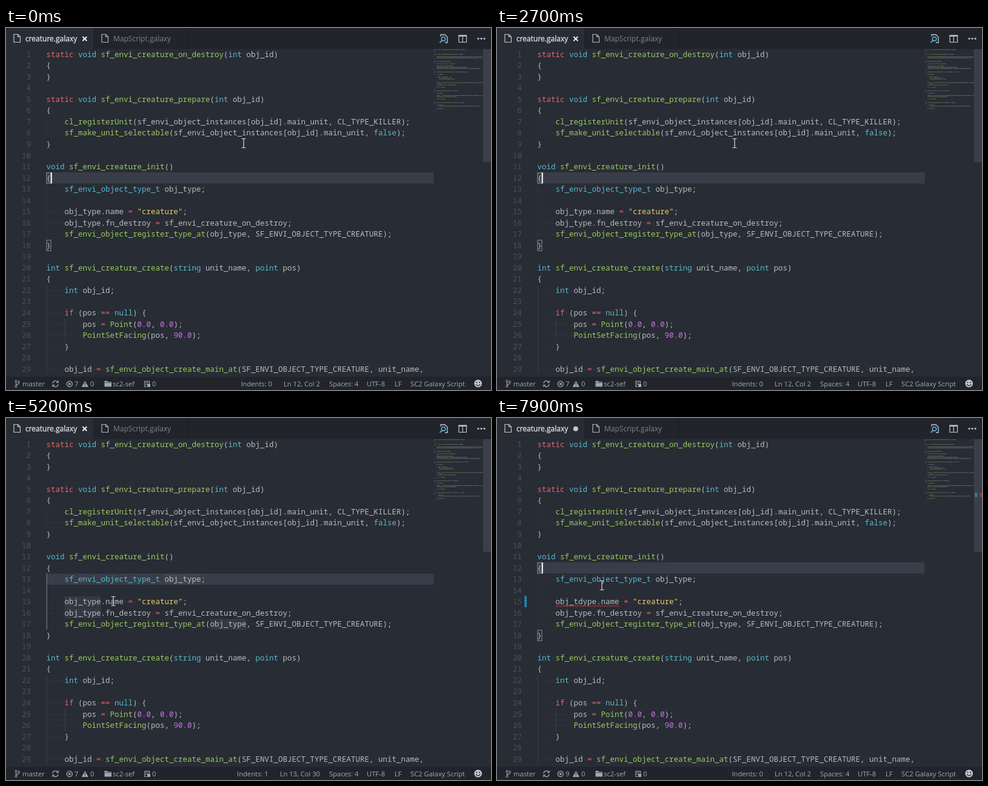
Write an HTML page that moves like this. It is 800 px wide and 597 px high and loops after 8000 ms.

```html
<!DOCTYPE html>
<html lang="en">
<head>
<meta charset="utf-8">
<title>Code editor</title>
<style>
html, body { margin: 0; width: 100%; height: 100%; overflow: hidden; background: #282c34; }
svg { display: block; width: 800px; height: 597px; }
.code { font: 12.5px "Noto Sans Mono", monospace; white-space: pre; }
.tab { font: 12px "Open Sans", sans-serif; }
.bar { font: 11.2px "Open Sans", sans-serif; fill: #a3a9b4; }
.end { text-anchor: end; }
</style>
</head>
<body>
<svg id="stage" viewBox="0 0 800 597" xmlns="http://www.w3.org/2000/svg"></svg>
<script>
(() => {
const LOOP = 8000, LEFT = 66.5, CHAR = 7.5, ROW = 18.536, SHOWN = 29;
const COLORS = { key: '#ee626b', type: '#57b9d0', fn: '#98cb62', num: '#c872e4',
  str: '#e8cd6c', text: '#babcc0', space: '#414650' };
const CODE = `static void sf_envi_creature_on_destroy(int obj_id)
{
}

static void sf_envi_creature_prepare(int obj_id)
{
    cl_registerUnit(sf_envi_object_instances[obj_id].main_unit, CL_TYPE_KILLER);
    sf_make_unit_selectable(sf_envi_object_instances[obj_id].main_unit, false);
}

void sf_envi_creature_init()
{
    sf_envi_object_type_t obj_type;

    obj_type.name = "creature";
    obj_type.fn_destroy = sf_envi_creature_on_destroy;
    sf_envi_object_register_type_at(obj_type, SF_ENVI_OBJECT_TYPE_CREATURE);
}

int sf_envi_creature_create(string unit_name, point pos)
{
    int obj_id;

    if (pos == null) {
        pos = Point(0.0, 0.0);
        PointSetFacing(pos, 90.0);
    }

    obj_id = sf_envi_object_create_main_at(SF_ENVI_OBJECT_TYPE_CREATURE, unit_name,
        pos);
    sf_envi_creature_prepare(obj_id);

    return obj_id;
}

int sf_envi_creature_add(unit main_unit)
{
    int obj_id;

    obj_id = sf_envi_object_add_at(SF_ENVI_OBJECT_TYPE_CREATURE, main_unit, null);
    sf_envi_creature_prepare(obj_id);

    return obj_id;
}

void sf_envi_creature_setup(int obj_id, int count)
{
    if (count) {
        sf_envi_object_set_at(obj_id, SF_ENVI_OBJECT_TYPE_CREATURE, count);
    }
    if (obj_id) {
    }
}`.split('\n');

const stage = document.getElementById('stage');
const SVG = 'http://www.w3.org/2000/svg';
function add(name, attrs = {}, parent = stage, text) {
  const node = document.createElementNS(SVG, name);
  for (const k in attrs) node.setAttribute(k, attrs[k]);
  if (text !== undefined) node.textContent = text;
  parent.appendChild(node);
  return node;
}
const rect = (x, y, width, height, fill, parent) => add('rect', { x, y, width, height, fill }, parent);
const line = (d, stroke, w = 1, parent = stage) =>
  add('path', { d, stroke, fill: 'none', 'stroke-width': w }, parent);
const label = (x, y, cls, text, parent) => add('text', { x, y, class: cls }, parent, text);
const show = (node, on) => node.setAttribute('display', on ? 'inline' : 'none');
const mid = n => 43.4 + (n - 1) * ROW;
const rowY = n => mid(n) - ROW / 2;
const colX = c => LEFT + (c - 1) * CHAR;
const rulerY = n => 104 + (n - 12) * 6.5;

function tokens(src) {
  const out = [];
  const re = /"[^"]*"|\d+\.\d+|[A-Za-z_]\w*|=+| +|[^\w\s="]/g;
  for (const m of src.matchAll(re)) {
    const w = m[0], next = src[m.index + w.length];
    const kind = w[0] === ' ' ? 'space' : w[0] === '"' ? 'str' : /^\d/.test(w) ? 'num'
      : /^(static|if|return|=+)$/.test(w) ? 'key'
      : /^(void|int|string|point|null|false|unit|sf_envi_object_type_t)$/.test(w) ? 'type'
      : /^\w/.test(w) && next === '(' ? 'fn' : 'text';
    out.push({ w, kind, at: m.index });
  }
  return out;
}
function writeLine(node, src) {
  if (node.src === src) return;
  node.src = src;
  node.textContent = '';
  for (const { w, kind, at } of tokens(src))
    add('tspan', { x: colX(at + 1), fill: COLORS[kind] }, node, kind === 'space' ? '·'.repeat(w.length) : w);
}
function zigzag(n, from, to) {
  let d = `M${colX(from)} ${mid(n) + 8.5}`;
  const steps = Math.round((to - from) * CHAR / 2.5);
  for (let i = 0; i < steps; i++) d += i % 2 ? 'l2.5 2.6' : 'l2.5 -2.6';
  return d;
}

// Editor surface
rect(0, 0, 800, 597, '#282c34');
const rowMark = rect(LEFT, 0, 639, ROW, '#383d49');
const words = (list, parent) => list.forEach(([n, c, len]) =>
  rect(colX(c), rowY(n) + .3, len * CHAR, ROW - .6, '#484e5b66', parent));
const objMarks = add('g'), nameMark = add('g');
words([[13, 27, 8], [15, 5, 8], [16, 5, 8], [17, 37, 8]], objMarks);
words([[15, 14, 4]], nameMark);

const guide = (c, a, b, color) => line(`M${colX(c) + .8} ${rowY(a)}V${rowY(b + 1)}`, color);
[[1, 7, 8], [1, 13, 17], [1, 22, 29], [5, 25, 26]].forEach(([c, a, b]) =>
  guide(c, a, b, a < 20 ? '#2f343d' : '#3b4048'));
const activeGuide = guide(1, 13, 17, '#7d828c');

const rows = [];
for (let n = 1; n <= SHOWN; n++) {
  add('text', { x: 41, y: mid(n) + 4.3, class: 'code end', fill: '#495162' }, stage, n);
  const node = add('text', { y: mid(n) + 4.3, class: 'code' });
  rows[n] = node;
  writeLine(node, CODE[n - 1]);
}

const brackets = add('g');
[12, 18].forEach(n => add('rect', { x: LEFT + .5, y: rowY(n) + .7, width: 7, height: 17.4,
  fill: 'none', stroke: '#8c919b' }, brackets));

const manyErrors = line([[11, 29, 30], [12, 1, 2], [13, 1, 5], [13, 36, 37], [14, 1, 2], [15, 1, 33],
  [16, 1, 56], [17, 1, 78], [19, 1, 2]].map(a => zigzag(...a)).join(''), '#d8392f', 1);
const fewErrors = line(zigzag(15, 5, 19), '#d8392f', 1);

const gutter = add('g');
rect(45.5, 0, 3.5, ROW, '#16698a', gutter);
add('path', { d: `M47.2 0V${ROW}`, stroke: '#27a5cf', 'stroke-width': 3.5, 'stroke-dasharray': '1.6 1.6' }, gutter);
const caret = rect(0, 0, 2, ROW - .4, '#f8f8f0');

// Minimap and overview ruler
const minimap = add('g', { opacity: .42 });
CODE.forEach((src, i) => tokens(src).forEach(({ w, kind, at }) => {
  if (kind !== 'space') rect(706 + at, 35.3 + i * 1.94, w.length, .9, COLORS[kind], minimap);
}));
rect(787, 35, 13, 186, '#3b3f49');
const manyRuler = rect(796.5, rulerY(11), 3.5, 64, '#b5322f');
const fewRuler = rect(796.5, rulerY(15), 3.5, 6.5, '#b5322f');
const editRuler = rect(788, 0, 4.5, 7, '#1b81a8');
const ruler = (n, h, parent) => rect(792, rulerY(n), 5, h, '#71757e', parent);
ruler(13, 6.5, objMarks);
ruler(15, 19.5, objMarks);
ruler(15, 6.5, nameMark);

// Tabs
rect(0, 0, 800, 34.5, '#21252b');
rect(0, 0, 145, 34.5, '#282c34');
rect(144.5, 0, 1, 34.5, '#1b1e23');
rect(299.5, 0, 1, 34.5, '#1b1e23');
const page = (x, color) => line(`M${x} 10.5h6.5l4 4v9h-10.5zM${x + 6.5} 10.5v4h4`, color, 1.2);
page(13, '#c5c5c5');
page(158, '#b0b3b8');
add('text', { x: 32, y: 22, class: 'tab', fill: '#e2e4e8', stroke: '#e2e4e8', 'stroke-width': .3 }, stage, 'creature.galaxy');
add('text', { x: 177, y: 22, class: 'tab', fill: '#7d828c' }, stage, 'MapScript.galaxy');
const closeMark = line('M126.3 14.3l7 7m0-7l-7 7', '#eceef0', 2);
const dirtyDot = add('circle', { cx: 129.8, cy: 17.8, r: 4, fill: '#c5c5c5' });
line('M717 14v-3h7l4 4v9h-4', '#c5c5c5', 1.3);
add('circle', { cx: 721.5, cy: 18, r: 3.2, fill: 'none', stroke: '#5fb0e0', 'stroke-width': 1.5 });
line('M719.3 20.4l-3.8 3.8', '#5fb0e0', 1.8);
line('M747 12.5h12.5v11h-12.5zM753.2 12v11.5', '#c5c5c5', 1.2);
rect(746.4, 11.5, 13.7, 2.5, '#c5c5c5');
[779, 784, 789].forEach(cx => add('circle', { cx, cy: 17.5, r: 1.6, fill: '#c5c5c5' }));

// Status bar
const INK = '#a3a9b4', BASE = 591;
rect(0, 575, 800, 22, '#21252b');
line('M16.5 583v7M21 584.5v1.2q0 1.8-4.5 2.8', INK, 1.2);
[[16.5, 582.3], [16.5, 591], [21, 583.6]].forEach(([cx, cy]) =>
  add('circle', { cx, cy, r: 1.5, fill: '#21252b', stroke: INK }));
label(27, BASE, 'bar', 'master');
line('M77 586a4.5 4.5 0 0 1 8-2.4M86 587.5a4.5 4.5 0 0 1-8 2.4', INK, 1.4);
line('M86.2 581.5v3.2h-3.3M76.8 592v-3.2h3.3', INK, 1.3);
add('circle', { cx: 104.8, cy: 587, r: 4.6, fill: 'none', stroke: INK, 'stroke-width': 1.3 });
line('M102.8 585l4 4m0-4l-4 4', INK, 1.3);
const errorText = label(113, BASE, 'bar', '7');
const after = add('g');
add('path', { d: 'M130.3 582l5.6 10h-11.2z', fill: INK }, after);
line('M130.3 585v3.3M130.3 589.3v1.4', '#21252b', 1.3, after);
label(139, BASE, 'bar', '0', after);
add('path', { d: 'M162.5 582h4.5l1 1.5h6v8h-11.5z', fill: INK }, after);
line('M163 584.8h10.5', '#21252b', .7, after);
label(176, BASE, 'bar', 'sc2-sef', after);
line('M229 582.5h7.5v4M229 582v9.5h3M230.5 585h4.5M230.5 587.5h3', INK, 1.2, after);
rect(233, 587, 5, 5, INK, after);
label(241, BASE, 'bar', '0', after);
const indentText = label(439, BASE, 'bar end', '');
const posText = label(518, BASE, 'bar end', '');
label(533, BASE, 'bar', 'Spaces: 4');
label(595, BASE, 'bar', 'UTF-8');
label(641, BASE, 'bar', 'LF');
label(667, BASE, 'bar', 'SC2 Galaxy Script');
add('circle', { cx: 778.7, cy: 586.3, r: 6.3, fill: '#c3c7ce' });
line('M775 587.3q3.7 5 7.4 0', '#21252b', 1.3);
[776.4, 781].forEach(cx => add('circle', { cx, cy: 584.5, r: 1.1, fill: '#21252b' }));

const pointer = line('M-3.5 -7.5h2.5l1 1l1-1h2.5M0 -6.5V6.5M-3.5 7.5h2.5l1-1l1 1h2.5', '#d8dade', 1.2);

// Time, line, column of the text cursor
const CARET = [[0, 12, 2], [400, 12, 1], [2300, 12, 2], [2900, 13, 2], [3050, 14, 1], [4600, 13, 30],
  [5700, 15, 16], [6400, 15, 10], [7100, 15, 11], [7700, 12, 2]];
// Time and place of the mouse
const MOUSE = [[0, 392, 190], [3700, 392, 190], [4050, 297, 257], [4400, 297, 257], [4560, 286, 265],
  [4700, 286, 265], [5150, 177, 302], [6150, 177, 302], [6380, 140, 294], [7450, 140, 294],
  [7680, 173, 250], [7720, 173, 250], [7870, 173, 276], [LOOP, 173, 276]];

function mouseAt(t) {
  const i = MOUSE.findIndex(k => k[0] > t);
  const [t0, x0, y0] = MOUSE[i - 1], [t1, x1, y1] = MOUSE[i];
  const p = (t - t0) / (t1 - t0), e = p * p * (3 - 2 * p);
  return [x0 + (x1 - x0) * e, y0 + (y1 - y0) * e];
}

function draw(t) {
  const within = (a, b) => t >= a && t < b;
  const [since, ln, col] = CARET.filter(k => k[0] <= t).pop();
  const cut = within(400, 2300), typed = t >= 7100, dirty = cut || typed;
  const many = within(800, 2300), few = t >= 7400;
  const inside = ln >= 13 && ln <= 17 && col > 1;

  writeLine(rows[12], cut ? '' : CODE[11]);
  writeLine(rows[15], typed ? CODE[14].replace('type', 'tdype') : CODE[14]);
  rowMark.setAttribute('y', rowY(ln));
  caret.setAttribute('x', colX(col) - .2);
  caret.setAttribute('y', rowY(ln) + .2);
  show(caret, (t - since) % 1000 < 500);
  show(brackets, ln === 12 && col === 2);
  show(activeGuide, inside);
  show(objMarks, within(4850, 5700) || within(6750, 7100));
  show(nameMark, within(5950, 6400));

  const edited = cut ? 12 : 15;
  gutter.setAttribute('transform', `translate(0 ${rowY(edited)})`);
  editRuler.setAttribute('y', rulerY(edited));
  [gutter, editRuler, dirtyDot].forEach(n => show(n, dirty));
  show(closeMark, !dirty);
  [manyErrors, manyRuler].forEach(n => show(n, many));
  [fewErrors, fewRuler].forEach(n => show(n, few));

  errorText.textContent = many ? 25 : few ? 9 : 7;
  after.setAttribute('transform', `translate(${many ? 6.5 : 0} 0)`);
  posText.textContent = `Ln ${ln}, Col ${col}`;
  indentText.textContent = `Indents: ${inside ? 1 : 0}`;
  indentText.setAttribute('x', col > 9 ? 432.6 : 439);
  pointer.setAttribute('transform', `translate(${mouseAt(t)})`);
}

function tick() {
  draw(performance.now() % LOOP);
  requestAnimationFrame(tick);
}
tick();
})();
</script>
</body>
</html>
```
